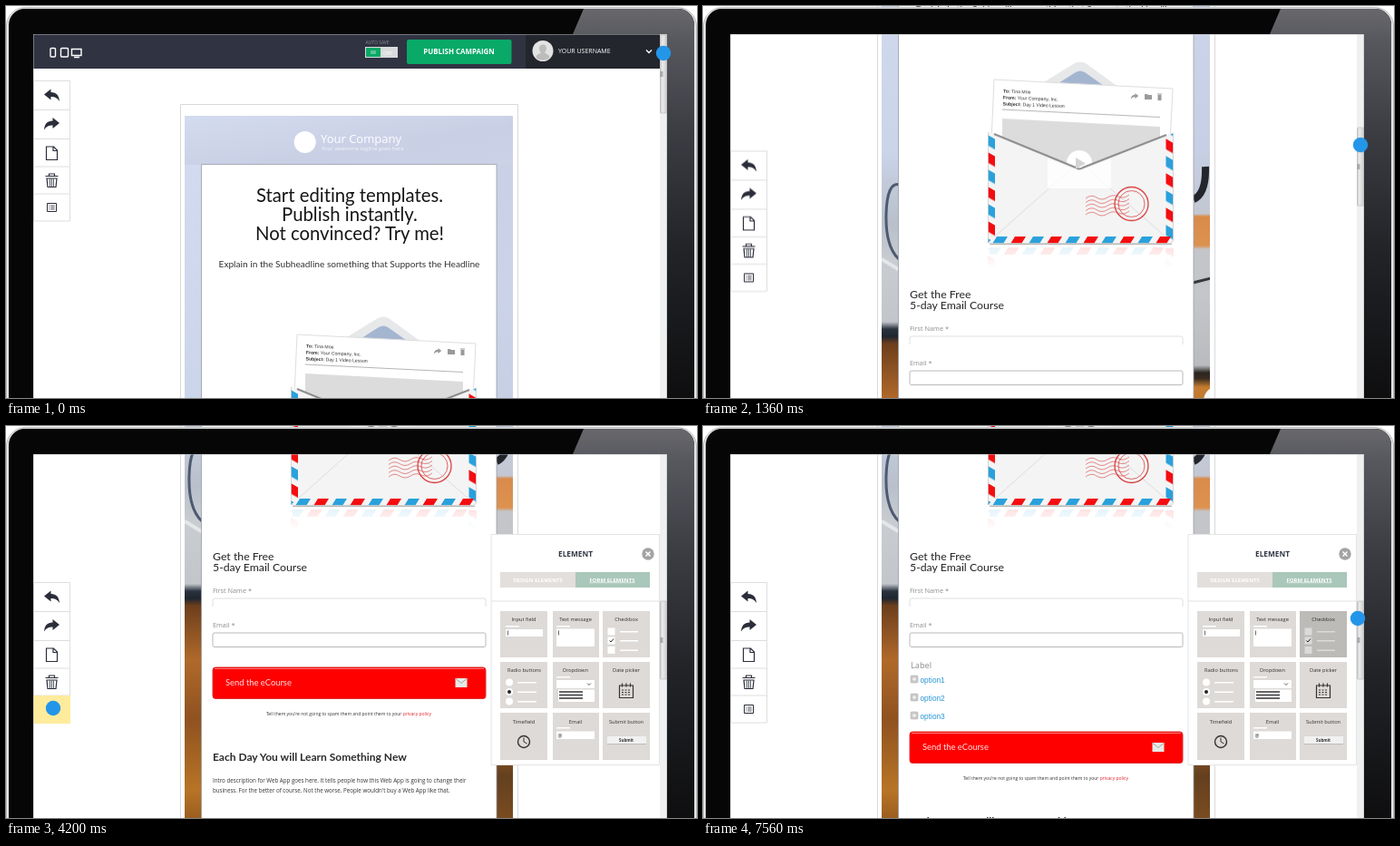
An HTML page that plays this animation: 762x432 px, repeating every 7.6 s.

```html
<!DOCTYPE html>
<html lang="en">
<head>
<meta charset="utf-8">
<title>Page editor demo</title>
<style>
html, body { margin: 0; width: 100%; height: 100%; overflow: hidden; background: #fff; }
svg { display: block; width: 762px; height: 432px; }
text { font-family: "Open Sans", sans-serif; font-variant-ligatures: none; white-space: pre; }
.lato { font-family: Lato, sans-serif; }
.arial { font-family: "Liberation Sans", Arial, sans-serif; }
.mid { text-anchor: middle; }
.bold { font-weight: 700; }
.line { fill: none; }

/* One 7.6 s loop drives every part. */
.scroll, .tools, .thumb, .cursor, .panel, .push { animation: 7.6s linear infinite; }
.pick, .hover, .ghost, .used { opacity: 0; animation: 7.6s step-end infinite; }
.options { animation: options 7.6s linear infinite; }
.scroll { animation-name: scroll; }
.tools { animation-name: tools; }
.thumb { animation-name: thumb; }
.cursor { animation-name: cursor; }
.panel { animation-name: panel; }
.push { animation-name: push; }
.pick { animation-name: pick; }
.hover { animation-name: hover; }
.ghost { animation-name: ghost; }
.used { animation-name: used; }
.drag { animation: drag 7.6s linear infinite; }

@keyframes scroll {
  0%, 2.632% { transform: translateY(0); }
  27.368%, 100% { transform: translateY(-455px); }
}
@keyframes tools {
  0%, 2.632% { transform: translateY(0); }
  20.395%, 100% { transform: translateY(90px); }
}
@keyframes thumb {
  0%, 2.632% { transform: translateY(0); }
  11.579% { transform: translateY(62px); }
  17.895% { transform: translateY(102px); }
  25.789% { transform: translateY(151px); }
  27.368%, 100% { transform: translateY(161px); }
}
@keyframes cursor {
  0%, 2.632% { transform: translate(725px, 52px); }
  11.579% { transform: translate(725px, 114px); }
  17.895% { transform: translate(725px, 153px); }
  25.789% { transform: translate(725px, 202px); }
  27.368%, 31.579% { transform: translate(725px, 212px); }
  41.579%, 61.053% { transform: translate(52px, 311px); }
  70.526%, 78.421% { transform: translate(682.5px, 231px); }
  88.421%, 94.737% { transform: translate(258px, 281px); }
  99.474%, 100% { transform: translate(722px, 212px); }
}
@keyframes panel {
  0%, 47.895% { transform: translateX(200px); }
  55.263%, 100% { transform: translateX(0); }
}
@keyframes drag {
  0%, 78.421% { transform: translate(0, 0); }
  88.421%, 100% { transform: translate(-424.5px, 50px); }
}
@keyframes push {
  0%, 87.368% { transform: translateY(0); }
  91.053%, 100% { transform: translateY(71px); }
}
@keyframes options {
  0%, 88.947% { opacity: 0; }
  91.053%, 100% { opacity: 1; }
}
@keyframes pick { 0% { opacity: 0; } 42.632% { opacity: 1; } 61.053%, 100% { opacity: 0; } }
@keyframes hover { 0% { opacity: 0; } 71.579% { opacity: .7; } 78.947%, 100% { opacity: 0; } }
@keyframes ghost { 0% { opacity: 0; } 78.947% { opacity: .9; } 88.947%, 100% { opacity: 0; } }
@keyframes used { 0% { opacity: 0; } 78.947%, 100% { opacity: .14; } }
</style>
</head>
<body>
<svg viewBox="0 0 762 432">
<defs>
  <linearGradient id="sky" x2="1" y2="1">
    <stop stop-color="#d3dbef"/><stop offset=".6" stop-color="#c9d0e5"/><stop offset="1" stop-color="#cbd1e6"/>
  </linearGradient>
  <linearGradient id="leftPhoto" gradientUnits="userSpaceOnUse" x1="0" y1="121" x2="0" y2="921">
    <stop stop-color="#d3dbef"/><stop offset=".4" stop-color="#cbd5ea"/><stop offset=".44" stop-color="#c3cbdb"/>
    <stop offset=".5" stop-color="#b9c0cb"/><stop offset=".55" stop-color="#c9ccd0"/><stop offset=".635" stop-color="#c2c5ca"/>
    <stop offset=".645" stop-color="#2a323e"/><stop offset=".655" stop-color="#1e2631"/><stop offset=".665" stop-color="#6d3f1d"/>
    <stop offset=".74" stop-color="#b0692a"/><stop offset=".82" stop-color="#8f5220"/><stop offset=".92" stop-color="#b87426"/><stop offset="1" stop-color="#7a4519"/>
  </linearGradient>
  <linearGradient id="rightPhoto" gradientUnits="userSpaceOnUse" x1="0" y1="121" x2="0" y2="921">
    <stop stop-color="#c9d0e5"/><stop offset=".25" stop-color="#cbd3e8"/><stop offset=".4" stop-color="#c6cfe4"/>
    <stop offset=".486" stop-color="#c3c7d2"/><stop offset=".49" stop-color="#d98b4b"/><stop offset=".53" stop-color="#dd9250"/>
    <stop offset=".535" stop-color="#c3c5c9"/><stop offset=".6" stop-color="#c4c6c9"/><stop offset=".695" stop-color="#b9bbbe"/>
    <stop offset=".705" stop-color="#2c2622"/><stop offset=".713" stop-color="#3a2c20"/><stop offset=".725" stop-color="#c67d30"/>
    <stop offset=".84" stop-color="#a05e24"/><stop offset=".9" stop-color="#63401f"/><stop offset="1" stop-color="#8a5420"/>
  </linearGradient>
  <linearGradient id="gloss" x2="0" y2="1">
    <stop stop-color="#68686c"/><stop offset=".08" stop-color="#57585e"/><stop offset=".3" stop-color="#3c3e44"/>
    <stop offset=".6" stop-color="#222428"/><stop offset="1" stop-color="#0d0d0e"/>
  </linearGradient>
  <linearGradient id="thumbFill">
    <stop stop-color="#c4c4c4"/><stop offset=".3" stop-color="#ececec"/><stop offset="1" stop-color="#c9c9c9"/>
  </linearGradient>
  <linearGradient id="fade" x2="0" y2="1">
    <stop stop-color="#fff" stop-opacity=".88"/><stop offset="1" stop-color="#fff"/>
  </linearGradient>
  <pattern id="side" width="12" height="38" patternUnits="userSpaceOnUse" patternTransform="translate(314 258) skewY(30)">
    <path fill="#2aa1dc" d="M0 0h12v11.500H0z"/><path fill="#f40d10" d="M0 19h12v11.500H0z"/>
  </pattern>
  <pattern id="side2" href="#side" patternTransform="translate(510 243) skewY(30)"/>
  <pattern id="bottom" width="40" height="12" patternUnits="userSpaceOnUse" patternTransform="translate(324 370) skewX(-32)">
    <path fill="#2aa1dc" d="M0 0h12v12H0z"/><path fill="#f40d10" d="M20 0h12v12H20z"/>
  </pattern>
  <clipPath id="photoClip"><path d="M197 121h362v800H197z"/></clipPath>
  <path id="back" d="M-8.500-1L-1-7V-3.500C5-3.500 8 0 8.500 6.500 6 2.500 3 1.500-1 1.500V5z"/>
</defs>

<rect width="762" height="432" fill="#fff"/>

<g class="scroll">
  <!-- editor header -->
  <path fill="#303341" d="M30 31h691v38H30z"/>
  <path fill="#24262d" d="M573 31h148v38H573z"/>
  <g class="line" stroke="#fff" stroke-width="1.400">
    <rect x="49" y="46.500" width="5.500" height="9.500" rx="1"/><rect x="60.500" y="46.500" width="8" height="9.500" rx="1"/>
    <path d="M72.500 47.500h10.500v7H72.500zM75 56.500h6"/><path d="M706 48.500l3 3 3-3"/>
  </g>
  <text x="396.500" y="42" font-size="5" fill="#8b8e98">AUTO SAVE</text>
  <path fill="#d9dadc" d="M396 45h36v12h-36z"/><path fill="#09a966" d="M397 46h16v10h-16z"/>
  <path d="M403 49v4m2-4v4m2-4v4" stroke="#cfeede" stroke-width=".8"/>
  <text x="416" y="53.500" font-size="5.500" fill="#fff">OFF</text>
  <rect x="442" y="37" width="115.500" height="27" rx="2" fill="#09a968"/>
  <text class="mid bold" x="499.500" y="53" font-size="7.900" fill="#fff">PUBLISH CAMPAIGN</text>
  <circle cx="592" cy="49.500" r="11.500" fill="#e3e3e3"/>
  <path fill="#bcbcbc" d="M584.500 57c0-4 4-4 5.500-5.500-4-5-1.500-9 2-9s6 4 2 9c1.500 1.500 5.500 1.500 5.500 5.500-4 3.500-11 3.500-15 0z"/>
  <text x="609" y="52.300" font-size="7" fill="#fff">YOUR USERNAME</text>

  <!-- page and its photo -->
  <path d="M192.500 930V108.500h372V930" fill="#fff" stroke="#d9d9dc"/>
  <g clip-path="url(#photoClip)">
    <path fill="url(#leftPhoto)" d="M197 121h20v800h-20z"/>
    <path fill="url(#rightPhoto)" d="M540 121h20v800h-20z"/>
    <path fill="url(#sky)" d="M197 121h362v54H197z"/>
    <g class="line">
      <path d="M217 478q-14-4-15 32t14 50" stroke="#4d5a70" stroke-width="3"/>
      <path d="M197 560l20 12" stroke="#e4e7ea" stroke-width="4"/>
      <path d="M541 494q14-6 13-36" stroke="#23252b" stroke-width="8"/>
      <path d="M540 586l20-5" stroke="#34353a" stroke-width="3"/>
    </g>
    <circle cx="568" cy="716" r="16" fill="#f6f6f6"/>
  </g>
  <path d="M215.500 930V174.500h325.500V930" fill="#fff" stroke="#9a9da8" stroke-width=".8"/>

  <circle cx="329.700" cy="150" r="12" fill="#fff"/>
  <text x="347" y="151" font-size="13" fill="#fff">Your Company</text>
  <text x="348" y="158.500" font-size="6" fill="#fff" opacity=".75">Your awesome tagline goes here</text>

  <g class="mid" fill="#151515">
    <text class="lato" x="379" y="215.500" font-size="20.300">Start editing templates.</text>
    <text class="lato" x="379" y="237" font-size="20.300">Publish instantly.</text>
    <text class="lato" x="379" y="258" font-size="20.300">Not convinced? Try me!</text>
    <text class="lato" x="378.500" y="287.500" font-size="10.150" fill="#333">Explain in the Subheadline something that Supports the Headline</text>
  </g>

  <!-- envelope -->
  <g transform="translate(0 165)">
    <path fill="#e7e8ea" d="M366 206l44-27q6-3 12 0l44 32z"/>
    <path fill="#a4b5d0" d="M384 206l27-17q5-3 10 0l27 19z"/>
    <path d="M321 197l197 10-4 80H317z" fill="#fff" stroke="#dedede"/>
    <g transform="rotate(2 331 211)" fill="#333">
      <text class="arial" x="331" y="211.500" font-size="5.200"><tspan class="bold">To:</tspan> Tina Moe</text>
      <text class="arial" x="331" y="218.500" font-size="5.200"><tspan class="bold">From:</tspan> Your Company, Inc.</text>
      <text class="arial" x="331" y="225.500" font-size="5.200"><tspan class="bold">Subject:</tspan> Day 1 Video Lesson</text>
    </g>
    <g fill="#9a9a9a">
      <use href="#back" transform="translate(476 215.500) scale(-.5 .5)"/>
      <path d="M487 213h3l1 1h4v5h-8zM501.500 214h4v6h-4zM501 212.500h5v1h-5z"/>
    </g>
    <path d="M330 230l174 8.500" stroke="#b5b5b5"/>
    <path fill="#dcdcdc" d="M330 240l174 9v50H330z"/>
    <circle cx="415" cy="289" r="14" fill="#fff"/>
    <path d="M314 254l8 3 89 37q4 3 8 0l91-36 9-3v119q0 4-4 4H318q-4 0-4-4z" fill="#f4f4f4"/>
    <path d="M321 257l90 37q4 3 8 0l92-36" class="line" stroke="#8e8e8e" stroke-width="2"/>
    <path d="M405 296L322 370m103-74l85 74" stroke="#dedede"/>
    <path d="M380 284l31 12q4 2 8 0l31-12v33h-70z" fill="#fff" opacity=".8"/>
    <path d="M411 283l11 6.500-11 6z" fill="#d4d4d4"/>
    <path fill="#fff" d="M314 254l8 4v112h188V259l9-4v119q0 4-4 4H318q-4 0-4-4z" fill-opacity="0"/>
    <path fill="#fff" d="M314 254l8 4v112h188V259l9-4v123H314zM322 258v112h188V259z" fill-rule="evenodd" opacity="0"/>
    <path fill="url(#side)" d="M314 255l8 4v111l-8 7z"/>
    <path fill="url(#side2)" d="M518.500 256l-8 4v110l8 7z"/>
    <path fill="url(#bottom)" d="M317 370h199v7.500H317z"/>
    <path d="M314.500 255v118q0 4.500 4 4.500h196q4 0 4-4.500V256" class="line" stroke="#cfcfcf" stroke-width=".8"/>
    <g class="line" stroke="#d9403f">
      <circle cx="472.500" cy="334" r="18.500" stroke-width="1.300"/><circle cx="472.500" cy="334" r="14.500" stroke-width=".8"/>
      <g stroke-width=".8" opacity=".75">
        <path id="wave" d="M422 328q6-5 12-1t12 0 12-1 12-2"/>
        <use href="#wave" y="4.500"/><use href="#wave" y="9"/><use href="#wave" y="13.500"/><use href="#wave" y="18"/>
      </g>
    </g>
    <path d="M316 378.500h201" stroke="#b5b5b5"/>
    <path fill="url(#bottom)" d="M316 382h201v8H316z"/><path fill="url(#side)" d="M314 383h8v20h-8z"/>
    <path fill="url(#side2)" d="M510 383h9v20h-9z"/><path fill="url(#fade)" d="M312 381h209v23H312z"/>
  </g>

  <!-- form -->
  <g transform="translate(0 455)">
    <g fill="#222" font-size="12.300">
      <text class="lato" x="228" y="147.500">Get the Free</text>
      <text class="lato" x="228" y="160">5-day Email Course</text>
    </g>
    <g fill="#8c8c8c" font-size="7.300">
      <text x="228" y="184">First Name *</text><text x="228" y="222">Email *</text>
    </g>
    <g class="line">
      <path d="M228 199v-7q0-2 2-2h297q2 0 2 2v7" stroke="#e0e0e0"/>
      <rect x="228" y="228" width="301" height="15.500" rx="2" stroke="#b9b9b9"/>
    </g>
    <g class="options">
      <text x="229" y="266.500" font-size="9.200" fill="#8a8a8a">Label</text>
      <g id="option">
        <rect x="229" y="275" width="8" height="8" rx="1" fill="#c9c9c9" stroke="#b5b5b5" stroke-width=".6"/>
        <path d="M231 279h4m-2-2v4" stroke="#fff"/>
      </g>
      <use href="#option" y="20"/><use href="#option" y="40"/>
      <g fill="#2a97d6" font-size="8.300">
        <text class="arial" x="239.500" y="282.500">option1</text><text class="arial" x="239.500" y="302.500">option2</text><text class="arial" x="239.500" y="322.500">option3</text>
      </g>
    </g>
    <g class="push">
      <rect x="228" y="266" width="301" height="34.500" rx="3" fill="#fe0000" stroke="#d33"/>
      <path d="M230 267.500h297" stroke="#ff7474"/>
      <text class="lato" x="242" y="286" font-size="9.400" fill="#ffe3e3">Send the eCourse</text>
      <path d="M495.500 278h13v10h-13z" fill="#e8eae6"/><path d="M495.500 278l6.500 5.500 6.500-5.500" class="line" stroke="#9aa"/>
      <text class="mid" x="378" y="318.700" font-size="5" fill="#333">Tell them you're not going to spam them and point them to your <tspan fill="#e0202a">privacy policy</tspan></text>
      <text class="lato bold" x="228" y="369" font-size="12" fill="#2b2b2b">Each Day You will Learn Something New</text>
      <g font-size="6.200" fill="#333">
        <text x="228" y="393">Intro description for Web App goes here. It tells people how this Web App is going to change their</text>
        <text x="228" y="404">business. For the better of course. Not the worse. People wouldn't buy a Web App like that.</text>
      </g>
    </g>
  </g>
</g>

<!-- toolbar -->
<g class="tools">
  <path d="M30.500 82.500h40v154.500h-40zM31 114.500h39M31 146.500h39M31 177h39M31 207h39" fill="#fff" stroke="#dedede"/>
  <g fill="#2b2e3a">
    <use href="#back" x="50.500" y="98.500"/><use href="#back" transform="translate(50.500 130) scale(-1 1)"/>
  </g>
  <g class="line" stroke="#2b2e3a" stroke-width="1.200">
    <path d="M44.500 155h8l4 4v10.500h-12zM52 155v4.500h4.500"/>
    <path d="M43.500 187.500h14M47.500 187v-2h6v2M45 190h11l-1 9.500h-9z"/>
    <path d="M48.500 190.500v8.500m2-8.500v8.500m2-8.500v8.500" stroke-width=".8"/>
    <path d="M45.500 217.500h10v9h-10z" stroke-width="1"/>
    <path d="M47.200 220h1m1 0h4.500m-6.500 2h1m1 0h4.500m-6.500 2h1m1 0h4.500" stroke-width=".8"/>
  </g>
  <path class="pick" fill="#feec9c" d="M30 207h41v31H30z"/>
</g>

<!-- scrollbar -->
<path fill="#f0f0f0" d="M721 31h8v401h-8z"/>
<g class="thumb">
  <rect x="721.500" y="32" width="7.500" height="86" rx="1" fill="url(#thumbFill)" stroke="#b5b5b5" stroke-width=".6"/>
  <path d="M721.500 73h3m-3 2h3m-3 2h3" stroke="#777"/>
</g>

<!-- element panel -->
<g class="panel">
  <path d="M535 119.500h185.500v254H535z" fill="#fff" stroke="#e4e4e4"/>
  <path d="M535 193h186" stroke="#e2e2e2"/>
  <text class="mid bold" x="628" y="143.500" font-size="8.300" fill="#333845">ELEMENT</text>
  <circle cx="708" cy="141" r="6.700" fill="#a3a3a3"/><path d="M705.500 138.500l5 5m0-5l-5 5" stroke="#fff" stroke-width="1.500"/>
  <path fill="#e2dfdc" d="M545 161h83v17h-83z"/><path fill="#a9c7ba" d="M628 161h82v17h-82z"/>
  <g class="mid bold" font-size="6" fill="#fff">
    <text x="586.500" y="171.500">DESIGN ELEMENTS</text><text x="668.500" y="171.500" text-decoration="underline">FORM ELEMENTS</text>
  </g>
  <path fill="#dddad7" d="M545 204h52v51h-52zM603 204h51v51h-51zM545 260h52v51h-52zM603 260h51v51h-51zM658 260h52v51h-52zM545 316h52v52h-52zM603 316h51v52h-51zM658 316h52v52h-52z"/>
  <g class="mid" font-size="5.700" fill="#333">
    <text x="571" y="215">Input field</text><text x="628" y="215">Text message</text>
    <text x="571.500" y="271">Radio buttons</text><text x="628" y="271">Dropdown</text><text x="684" y="271">Date picker</text>
    <text x="571" y="328">Timefield</text><text x="628" y="328">Email</text><text x="684" y="328">Submit button</text>
  </g>
  <g fill="#fff">
    <path d="M551 220h15v1.500h-15zM551 224h41v8h-41zM607 220h15v1.500h-15zM607 223.500h42v19.500h-42zM607 276h15v1.500h-15zM607 280h42v9h-42zM607 332h15v1.500h-15zM607 336.500h42v8.500h-42z"/>
    <circle cx="555" cy="282.500" r="4"/><circle cx="555" cy="293" r="4"/><circle cx="555" cy="303.500" r="4"/>
    <path d="M564 282h21v1.500h-21zM564 292.500h21v1.500h-21zM564 303h21v1.500h-21z"/>
    <path d="M609 290.500h40v13.500h-40z"/>
  </g>
  <circle cx="555" cy="293" r="2" fill="#222"/>
  <g class="line" stroke="#333">
    <path d="M553.500 225.500v5M609.500 225.500v5" stroke-width=".7"/>
    <path d="M641 283.500l2 2 2-2" stroke-width=".8"/>
    <path d="M610 293h26m-26 3.500h26m-26 3.500h26" stroke-width="1.500"/>
    <path d="M676.500 286h15v13.500h-15zM679.500 283.500v4m4.500-4v4m4.500-4v4" stroke-width="1.200"/>
    <path d="M679 291h10.500m-10.500 2.500h10.500M679 296h10.500" stroke-dasharray="2 1.500"/>
    <circle cx="571" cy="348" r="6.500" stroke-width="1.400"/><path d="M571 343.500v4.500l3.500 2"/>
  </g>
  <text x="608.500" y="343" font-size="5.500" fill="#333">@</text>
  <path fill="#f1f1f1" d="M663 342h43v8h-43z"/><path d="M663 350.500h43" stroke="#bbb"/>
  <text class="mid bold" x="684" y="347.500" font-size="4.500" fill="#333">Submit</text>
  <g id="checkTile">
    <path fill="#dddad7" d="M658 204h52v51h-52z"/>
    <text class="mid" x="684" y="215" font-size="5.700" fill="#333">Checkbox</text>
    <path fill="#fff" d="M663.500 222.500h8v8h-8zM663.500 232.500h8v8h-8zM663.500 243h8v8h-8zM677 226h20v1.500h-20zM677 236h20v1.500h-20zM677 246.500h20v1.500h-20z"/>
    <path d="M665.500 236.500l1.500 1.500 3-3.500" class="line" stroke="#222"/>
  </g>
  <path class="hover" fill="#93caee" d="M658 204h52v51h-52z"/>
  <path class="used" d="M658 204h52v51h-52z"/>
</g>

<g class="ghost"><g class="drag">
  <use href="#checkTile"/><path fill="#93caee" opacity=".7" d="M658 204h52v51h-52z"/>
</g></g>

<!-- laptop frame -->
<path d="M.5 440V22A21 21 0 0 1 21.500 1.500H740.500A21 21 0 0 1 761.500 22V440H729V31H30V440z" fill="#e3e5e5" stroke="#b9bcbc"/>
<path d="M3 440V21A18 18 0 0 1 21 3H741A18 18 0 0 1 759 21V440H729V31H30V440z" fill="#060606"/>
<path d="M637 3H741A18 18 0 0 1 759 21V440H729V31H625z" fill="url(#gloss)"/>

<circle class="cursor" r="8.200" fill="#2396e9"/>
</svg>
</body>
</html>
```
